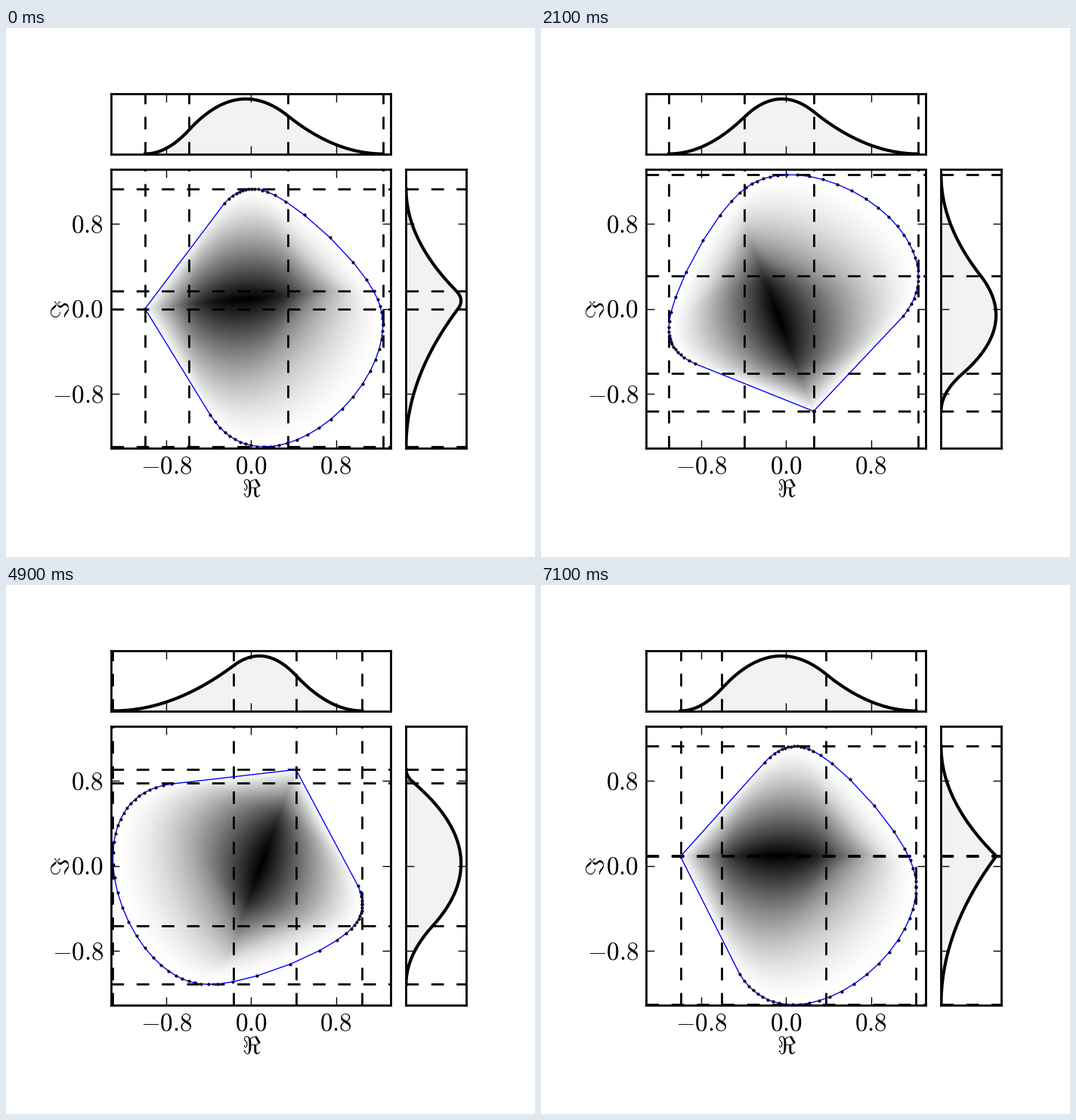
Animation of 700x700 px, one loop 7200 ms. Source, as a matplotlib script:

```python
import numpy as np
import matplotlib.pyplot as plt
from matplotlib.animation import FuncAnimation
from matplotlib.transforms import Affine2D

SIZE, DPI = 700, 200
FRAMES, INTERVAL = 72, 100
LIM = 1.317
TICKS = [-0.8, 0.0, 0.8]

plt.rcParams["mathtext.fontset"] = "cm"

# 4x4 matrix with eigenvalues -1, 1, -i, i and two unit couplings
A = np.diag([-1, 1, -1j, 1j])
A[1, 2] = A[2, 3] = 1


def hermitian(m, theta):
    """Hermitian part of m seen along direction theta."""
    r = np.exp(-1j * theta) * m
    return (r + r.conj().T) / 2


def weights(lam):
    """Divided-difference weights for the knots lam."""
    gaps = lam[:, None] - lam[None, :]
    np.fill_diagonal(gaps, 1)
    return 1 / gaps.prod(axis=1)


def marginal(lam, n=300):
    """Quadratic B-spline on four knots, scaled to a peak of one."""
    s = np.linspace(lam[0], lam[-1], n)
    p = (weights(lam)[:, None] * np.maximum(lam[:, None] - s, 0) ** 2).sum(axis=0)
    return s, p / p.max()


def density(n=300, angles=360):
    """Planar density recovered from its marginals (inverse Radon transform)."""
    c = (np.arange(n) + 0.5) / n * 2 * LIM - LIM
    x, y = np.meshgrid(c, c)
    total = np.zeros((n, n))
    for theta in (np.arange(angles) + 0.37) * np.pi / angles:
        s = x * np.cos(theta) + y * np.sin(theta)
        lam = np.linalg.eigvalsh(hermitian(A, theta))
        for w, k in zip(weights(lam), lam):
            d = k - s
            total += w * d * np.log(np.abs(d) + 1e-12)
    return np.clip(total / total.max(), 0, 1)


def boundary(m):
    """Support points of the numerical range, every 0.1 rad."""
    pts = []
    for theta in np.arange(0, 2 * np.pi + 0.1, 0.1):
        v = np.linalg.eigh(hermitian(m, theta))[1][:, -1]
        pts.append(v.conj() @ m @ v)
    return np.array(pts)


fig = plt.figure(figsize=(SIZE / DPI, SIZE / DPI), dpi=DPI, facecolor="white")


def panel(left, top, right, bottom):
    """Axes placed by pixel edges measured from the top left."""
    ax = fig.add_axes([left / SIZE, 1 - bottom / SIZE,
                       (right - left) / SIZE, (bottom - top) / SIZE])
    ax.tick_params(direction="in", length=4, width=0.5, top=True, right=True,
                   labelbottom=False, labelleft=False)
    for spine in ax.spines.values():
        spine.set_linewidth(1)
    ax.set_xticks([])
    ax.set_yticks([])
    return ax


X0, X1, Y0, Y1 = 139.45, 509.35, 186.6, 556.4
main = panel(X0, Y0, X1, Y1)
upper = panel(X0, 86.6, X1, 166.6)
side = panel(529.4, Y0, 609.4, Y1)

image = main.imshow(density(), extent=(-LIM, LIM, -LIM, LIM), origin="lower",
                    cmap="gray_r", vmin=0, vmax=1, interpolation="bilinear",
                    aspect="auto")

for ax in (main, upper):
    ax.set_xticks(TICKS)
    ax.set_xlim(-LIM, LIM)
for ax in (main, side):
    ax.set_yticks(TICKS)
    ax.set_ylim(-LIM, LIM)
upper.set_ylim(0, 1.1)
side.set_xlim(0, 1.1)


def label(x, y, text, **kw):
    fig.text(x / SIZE, 1 - y / SIZE, text, fontsize=12, va="baseline", **kw)


for t in TICKS:
    label((X0 + X1) / 2 + t * (X1 - X0) / (2 * LIM), 589, f"${t}$", ha="center")
    label(129.5, 382.7 - t * (Y1 - Y0) / (2 * LIM), f"${t}$", ha="right")
label(325, 620, r"$\Re$", ha="center")
label(83.5, 372, r"$\Im$", ha="center", rotation=90, rotation_mode="anchor")

dash = dict(color="black", lw=1, dashes=(6, 6))
v_lines = [[ax.axvline(0, **dash) for _ in range(4)] for ax in (main, upper)]
h_lines = [[ax.axhline(0, **dash) for _ in range(4)] for ax in (main, side)]
outline, = main.plot([], [], "b.-", lw=0.5, ms=2, mec="black", mew=0.5)


def curve(ax):
    area, = ax.fill([0, 0, 0], [0, 0, 0], color="black", alpha=0.05, lw=0)
    line, = ax.plot([], [], color="black", lw=1.5)
    return area, line


upper_curve, side_curve = curve(upper), curve(side)


def set_curve(parts, x, y):
    area, line = parts
    area.set_xy(np.column_stack([x, y]))
    line.set_data(x, y)


def update(frame):
    phi = 2 * np.pi * frame / FRAMES
    m = np.exp(1j * phi) * A
    image.set_transform(Affine2D().rotate(phi) + main.transData)

    pts = boundary(m)
    outline.set_data(pts.real, pts.imag)

    re = np.linalg.eigvalsh(hermitian(m, 0))
    im = np.linalg.eigvalsh(hermitian(m, np.pi / 2))
    for group in v_lines:
        for line, k in zip(group, re):
            line.set_xdata([k, k])
    for group in h_lines:
        for line, k in zip(group, im):
            line.set_ydata([k, k])

    s, p = marginal(re)
    set_curve(upper_curve, s, p)
    s, p = marginal(im)
    set_curve(side_curve, p, s)
    return []


anim = FuncAnimation(fig, update, frames=FRAMES, interval=INTERVAL,
                     init_func=lambda: update(0), repeat=True, repeat_delay=0)
plt.show()
```
